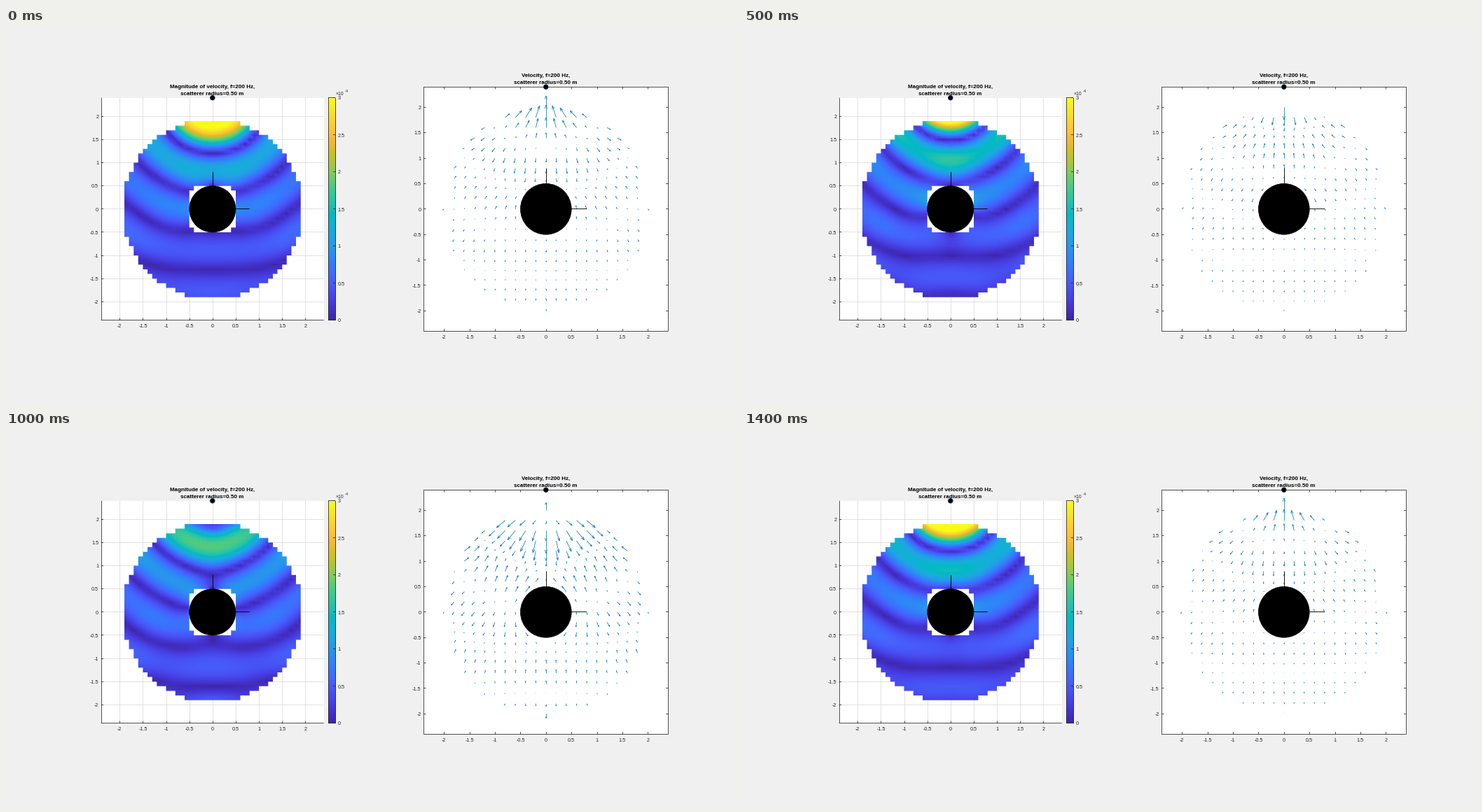
A matplotlib script that plays this animation: 1045 by 536 pixels, repeating every 1.5 s.

```python
import numpy as np
import matplotlib.pyplot as plt
from matplotlib.animation import FuncAnimation
from matplotlib.collections import LineCollection
from matplotlib.colors import LinearSegmentedColormap
from matplotlib.patches import Circle, Rectangle

W, H, DPI = 1045, 536, 64
PT = 72 / DPI                      # points per pixel
FRAMES = 15
INK, BLUE = "#262626", "#0072BD"

# Acoustics: point source above a rigid sphere
FREQ, SPEED, DENSITY = 200, 343, 1.2
RADIUS, SOURCE_Y, LIMIT, ORDER = 0.5, 2.4, 2.0, 10
OMEGA = 2 * np.pi * FREQ
K = OMEGA / SPEED
V_MAX = 3e-4

PARULA = LinearSegmentedColormap.from_list("parula", (
    "#3e26a8 #4332cb #4741e5 #4852f4 #4563fd #3875fe #2e87f7 #2797eb "
    "#20a5e3 #12b1d6 #02bac3 #24c1ae #37c897 #57cc7a #81cc59 #abc739 "
    "#d1bf27 #f0ba36 #fec338 #fad62d #f5e924 #f9fb15").split(), N=256)


def hankel(x):
    """Spherical Hankel functions of the first kind and their derivatives."""
    x = np.asarray(x, float)
    prev, cur = np.exp(1j * x) / x, np.exp(1j * x) / (1j * x)
    values, slopes = [], []
    for n in range(ORDER + 1):
        values.append(cur)
        slopes.append(prev - (n + 1) / x * cur)
        prev, cur = cur, (2 * n + 1) / x * cur - prev
    return values, slopes


def velocity(x, y):
    """Complex velocity amplitudes (vx, vy) outside the sphere."""
    r = np.maximum(np.hypot(x, y), RADIUS)
    mu = np.clip(y / r, -1, 1)
    h, dh = hankel(K * r)
    _, dh_wall = hankel(K * RADIUS)
    h_source, _ = hankel(K * SOURCE_Y)

    radial = np.zeros_like(r, complex)
    angular = np.zeros_like(r, complex)
    p_prev, p = np.zeros_like(r), np.ones_like(r)
    dp_prev, dp = np.zeros_like(r), np.zeros_like(r)
    for n in range(ORDER + 1):
        coef = 1j * K * (2 * n + 1) / (4 * np.pi) * h_source[n]
        reflect = dh_wall[n].real / dh_wall[n]
        radial += coef * K * (dh[n].real - reflect * dh[n]) * p
        angular += coef * (h[n].real - reflect * h[n]) * dp
        p_next = ((2 * n + 1) * mu * p - n * p_prev) / (n + 1)
        dp_next = dp_prev + (2 * n + 1) * p
        p_prev, p, dp_prev, dp = p, p_next, dp, dp_next

    scale = 1 / (1j * OMEGA * DENSITY)
    vx = radial * x / r - angular * mu * x / r**2
    vy = radial * y / r + angular * (1 - mu * y / r) / r
    return vx * scale, vy * scale


# Sampling grid
STEP = 0.1
axis_pts = np.arange(-20, 21) / 10
GX, GY = np.meshgrid(axis_pts, axis_pts)
GR = np.hypot(GX, GY)
blocked = (GR < RADIUS - 1e-6) | (np.isclose(GR, RADIUS) & (GX * GY != 0))
valid = (GR <= LIMIT + 1e-6) & ~blocked
whole_cell = valid[:-1, :-1] & valid[1:, :-1] & valid[:-1, 1:] & valid[1:, 1:]
VX, VY = velocity(GX, GY)

# Pixel layout of both plots
LEFT = dict(cx=294.8, cy=258.8, unit=66.25)
RIGHT = dict(cx=770.8, cy=258.8, unit=72.75)


def to_px(plot, x, y):
    return plot["cx"] + plot["unit"] * x, plot["cy"] - plot["unit"] * y


def locate(px, py):
    """Cell indices and in-cell position of pixels in the left plot."""
    fx = ((px - LEFT["cx"]) / LEFT["unit"] + LIMIT) / STEP
    fy = ((LEFT["cy"] - py) / LEFT["unit"] + LIMIT) / STEP
    i, j = fx.astype(int), fy.astype(int)
    return i, j, fx - i, fy - j


# Surface pixels: interpolation weights and edge coverage
X0, X1, Y0, Y1 = 168, 422, 132, 386
px, py = np.meshgrid(np.arange(X0, X1) + 0.5, np.arange(Y0, Y1) + 0.5)
ci, cj, u, v = locate(px, py)
coverage = np.zeros(px.shape)
offsets = (np.arange(4) - 1.5) / 4
for dx in offsets:
    for dy in offsets:
        i, j, _, _ = locate(px + dx, py + dy)
        coverage += whole_cell[j, i] / 16


def surface(grid):
    """Linear interpolation over two triangles per cell."""
    a, b = grid[cj, ci], grid[cj, ci + 1]
    c, d = grid[cj + 1, ci], grid[cj + 1, ci + 1]
    lower = a + u * (b - a) + v * (c - a)
    upper = d + (1 - u) * (c - d) + (1 - v) * (b - d)
    return np.where(u + v < 1, lower, upper)


# Arrows sit on every second grid point
coarse = np.zeros_like(valid)
coarse[::2, ::2] = True
pick = coarse & valid
base = np.column_stack(to_px(RIGHT, GX[pick], GY[pick]))
MAX_ARROW = 0.9 * np.sqrt(2) * 4 / 21 * RIGHT["unit"]


def arrows(vx, vy):
    vec = np.column_stack([vx[pick], -vy[pick]])
    vec *= MAX_ARROW / np.hypot(*vec.T).max()
    side = vec[:, ::-1] * [-1, 1]
    tip = base + vec
    barbs = [tip - 0.27 * vec + s * 0.1 * side for s in (-1, 1)]
    return (list(np.stack([base, tip], 1))
            + list(np.stack([barbs[0], tip, barbs[1]], 1)))


fig = plt.figure(figsize=(W / DPI, H / DPI), dpi=DPI, facecolor="#f0f0f0")
ax = fig.add_axes([0, 0, 1, 1])
ax.axis("off")


def line(x0, y0, x1, y1, color=INK, width=0.8, z=3):
    """Horizontal or vertical line centred on a pixel row or column."""
    if x0 == x1:
        x0 = x1 = round(x0) + 0.5
    else:
        y0 = y1 = int(y0) + 0.5
    ax.plot([x0, x1], [y0, y1], color=color, lw=width * PT, zorder=z,
            solid_capstyle="butt", snap=False)


def box(x0, y0, x1, y1):
    for y in (y0, y1):
        line(x0, y, x1, y)
    for x in (x0, x1):
        line(x, y0, x, y1)


def label(x, y, text, size=7.3, ha="center", **kw):
    ax.text(x, y, text, fontsize=size * PT, ha=ha, va="baseline",
            family="Liberation Sans", color=kw.pop("color", INK),
            zorder=6, **kw)


def draw_plot(plot, title, grid, boxed):
    x0, y0 = to_px(plot, -2.4, 2.4)
    x1, y1 = to_px(plot, 2.4, -2.4)
    ax.add_patch(Rectangle((x0, y0), x1 - x0, y1 - y0, fc="white", lw=0,
                           zorder=0))
    for t in np.arange(-4, 5) / 2:
        tx, ty = to_px(plot, t, t)
        if grid:
            line(tx, y0, tx, y1, "#dadada", z=1)
            line(x0, ty, x1, ty, "#dadada", z=1)
        line(tx, y1, tx, y1 - 3.3)
        line(x0, ty, x0 + 3.3, ty)
        if boxed:
            line(tx, y0, tx, y0 + 3.3)
            line(x1, ty, x1 - 3.3, ty)
        label(tx, y1 + 10.5, f"{t:g}")
        label(x0 - 3.6, ty + 2.7, f"{t:g}", ha="right")
    if boxed:
        box(x0, y0, x1, y1)
    else:
        line(x0, y0, x0, y1)
        line(x0, y1, x1, y1)

    cx, cy, unit = plot["cx"], plot["cy"], plot["unit"]
    ax.add_patch(Circle((cx, cy), RADIUS * unit, fc="black", ec="black",
                        lw=0.7 * PT, zorder=5))
    line(cx, cy, cx, cy - 0.8 * unit, "black", 0.9, 5)
    line(cx, cy, cx + 0.8 * unit, cy, "black", 0.9, 5)
    ax.add_patch(Circle((cx, y0), 3.3, fc="black", ec="#0b3350",
                        lw=0.8 * PT, zorder=5))
    for row, text in enumerate((title, "scatterer radius=0.50 m")):
        label(cx - 0.3, y0 - 13.7 + 9.6 * row, text, 8, weight="bold",
              color="black")


def draw_colorbar():
    x0, x1 = 460, 470
    y0, y1 = (to_px(LEFT, 0, s * 2.4)[1] for s in (1, -1))
    ax.imshow(np.linspace(1, 0, 256)[:, None], cmap=PARULA, aspect="auto",
              extent=(x0, x1 + 1, y1, y0), zorder=2)
    box(x0, y0, x1, y1)
    for i in range(7):
        y = y1 - (y1 - y0) * i / 6
        line(x1 - 3, y, x1, y)
        label(x1 + 3.6, y + 2.7, f"{i / 2:g}", ha="left")
    label(471, 95.6, "×10", 6.8, "left")
    label(483.4, 92.3, "-4", 5.6, "left")


draw_plot(LEFT, "Magnitude of velocity, f=200 Hz,", grid=True, boxed=False)
draw_plot(RIGHT, "Velocity, f=200 Hz,", grid=False, boxed=True)
draw_colorbar()

# White backing hides the grid behind the surface and in its central hole
hole = RADIUS * LEFT["unit"]
ax.add_patch(Rectangle((LEFT["cx"] - hole, LEFT["cy"] - hole), 2 * hole,
                       2 * hole, fc="white", lw=0, zorder=1.5))
field = ax.imshow(np.zeros(px.shape), cmap=PARULA, vmin=0, vmax=V_MAX,
                  alpha=np.clip(coverage, 0, 1), extent=(X0, X1, Y1, Y0),
                  aspect="auto", interpolation="nearest", zorder=2)
quiver = LineCollection([], colors=BLUE, linewidths=0.75 * PT,
                        capstyle="butt", zorder=4)
ax.add_collection(quiver, autolim=False)
ax.set_xlim(0, W)
ax.set_ylim(H, 0)


def update(frame):
    turn = np.exp(-2j * np.pi * frame / FRAMES)
    vx, vy = (VX * turn).real, (VY * turn).real
    field.set_data(surface(np.hypot(vx, vy)))
    quiver.set_segments(arrows(vx, vy))
    return field, quiver


anim = FuncAnimation(fig, update, frames=FRAMES, interval=100, repeat=True)
plt.show()
```
